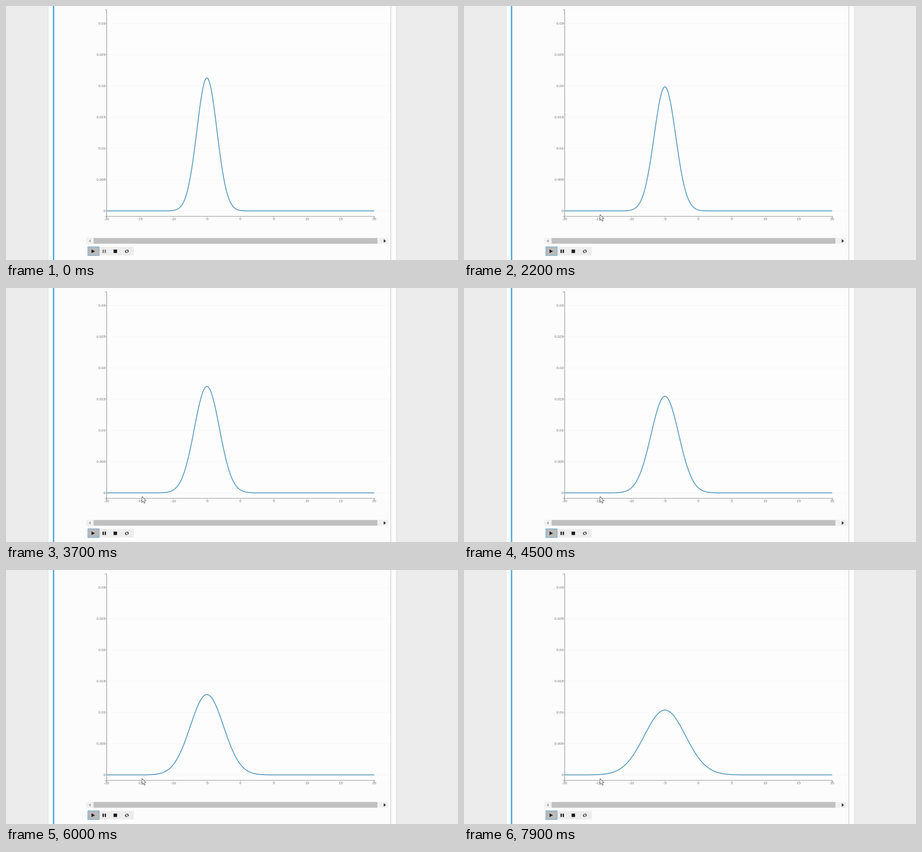
Write an HTML page with a canvas that moves like this. It is 998 px wide and 561 px high and loops after 8 s.

```html
<!DOCTYPE html>
<html lang="en">
<head>
<meta charset="utf-8">
<title>Spreading wave packet</title>
<style>
  html, body { margin: 0; width: 100%; height: 100%; overflow: hidden; background: #ececec; }
  canvas { display: block; width: 998px; height: 561px; }
</style>
</head>
<body>
<canvas id="stage" width="998" height="561"></canvas>
<script>
const ctx = document.getElementById('stage').getContext('2d');
const LOOP = 8000, STEP = 100, START = 400;

// Plot coordinates
const LEFT = 222, UNIT_X = 14.775, BASE = 452.6, UNIT_Y = 13806;
const px = x => LEFT + (x + 20) * UNIT_X;
const py = y => BASE - y * UNIT_Y;

// Packet: centre, initial width, grid spacing
const MEAN = -5, SIGMA = 1.5, DX = 0.08;

// [time, dimensionless spreading time]
const SPREAD = [
  [START, 0], [900, 0.106], [2200, 0.387], [3700, 0.749],
  [5400, 1.167], [6700, 1.496], [7900, 1.79]
];

function spreadAt(t) {
  if (t <= START) return 0;
  for (let i = 1; i < SPREAD.length; i++) {
    const [t0, a] = SPREAD[i - 1], [t1, b] = SPREAD[i];
    if (t <= t1) return a + (b - a) * (t - t0) / (t1 - t0);
  }
  return SPREAD[SPREAD.length - 1][1];
}

function rect(x, y, w, h, color) {
  ctx.fillStyle = color;
  ctx.fillRect(x, y, w, h);
}

function trace(points) {
  ctx.beginPath();
  points.forEach(([x, y], i) => i ? ctx.lineTo(x, y) : ctx.moveTo(x, y));
}

function fillShape(points, color) {
  trace(points);
  ctx.closePath();
  ctx.fillStyle = color;
  ctx.fill();
}

function strokeShape(points, color, width) {
  trace(points);
  ctx.strokeStyle = color;
  ctx.lineWidth = width;
  ctx.stroke();
}

function drawPage() {
  rect(0, 0, 998, 561, '#ececec');
  rect(92, 0, 771, 561, '#e6e6e6');
  rect(94, 0, 767, 561, '#fefefe');
  rect(103.5, 0, 3, 561, '#4ba3d9');
  rect(107, 0, 742, 561, '#fcfcfc');
  rect(222, 8, 626, 457, '#fdfdfd');
  rect(849, 0, 1.3, 561, '#cacaca');
}

function drawAxes() {
  ctx.font = '7.8px "Liberation Sans", Arial, sans-serif';
  ctx.textBaseline = 'middle';
  ctx.textAlign = 'right';
  for (let i = 0; i <= 6; i++) {
    const y = py(i * 0.005);
    rect(LEFT, y - 0.5, 626, 1, '#f6f6f6');
    rect(219, y - 0.5, 3, 1, '#b0b0b0');
    ctx.fillStyle = '#6c6c6c';
    ctx.fillText(String(i * 5 / 1000), 219.5, y + 0.5);
  }
  ctx.textAlign = 'center';
  for (let x = -20; x <= 20; x += 5) {
    rect(px(x) - 0.5, 465, 1, 2, '#b0b0b0');
    ctx.fillStyle = '#6c6c6c';
    ctx.fillText(String(x), px(x), 470.5);
  }
  strokeShape([[218, 8.5], [222.3, 8.5], [222.3, 464.5], [218, 464.5]], '#8e8e8e', 1.2);
  strokeShape([[222.3, 469], [222.3, 464.5], [813, 464.5], [813, 469]], '#8e8e8e', 1.2);
}

function drawCurve(t) {
  const sigma = SIGMA * Math.hypot(1, spreadAt(t));
  const peak = DX / (sigma * Math.sqrt(2 * Math.PI));
  const points = [];
  for (let x = -20; x <= 20.001; x += DX) {
    const z = (x - MEAN) / sigma;
    points.push([px(x), py(peak * Math.exp(-z * z / 2))]);
  }
  ctx.lineJoin = 'round';
  strokeShape(points, '#5d9dc0', 2);
  ctx.lineJoin = 'miter';
}

function drawScrollbar() {
  rect(177, 512, 667, 13.5, '#f1f1f1');
  rect(193.5, 512.5, 626.5, 12.5, '#c0c0c0');
  fillShape([[187, 515.5], [187, 522.5], [182.5, 519]], '#a8a8a8');
  fillShape([[834, 515], [834, 523], [839, 519]], '#383838');
}

function drawButtons(running) {
  rect(180, 532, 102, 19, '#ededed');
  rect(180.5, 531.5, 25.5, 20, '#b9b9b9');
  ctx.strokeStyle = '#7db3d6';
  ctx.lineWidth = 1.4;
  ctx.strokeRect(180.7, 531.9, 25, 19.2);
  fillShape([[188.8, 537.6], [188.8, 545.8], [196.3, 541.7]], '#1c1c1c');

  const pause = running ? '#202020' : '#777';
  rect(213.2, 538, 2.8, 7.5, pause);
  rect(217.9, 538, 2.8, 7.5, pause);
  rect(237.5, 538, 7.7, 7.5, '#1c1c1c');

  // Repeat arrows
  strokeShape([[264, 542], [264, 544.6], [268.2, 544.6]], '#333', 1.4);
  strokeShape([[265.4, 539.2], [269.6, 539.2], [269.6, 541.8]], '#333', 1.4);
  fillShape([[262, 542.2], [266, 542.2], [264, 539.2]], '#333');
  fillShape([[267.6, 541.6], [271.6, 541.6], [269.6, 544.6]], '#333');
}

function drawCursor() {
  const arrow = [[300.3, 460.5], [300.3, 473.5], [303.2, 470.9], [305.1, 475.2],
    [307.3, 474.2], [305.4, 470], [309, 469.6]];
  fillShape(arrow, '#fff');
  strokeShape([...arrow, arrow[0]], '#6a6a6a', 1.1);
}

function draw(now) {
  const t = Math.floor((now % LOOP) / STEP) * STEP;
  const running = t >= START;
  drawPage();
  drawAxes();
  drawCurve(t);
  drawScrollbar();
  drawButtons(running);
  if (running) drawCursor();
}

let origin = null;
function tick(now) {
  if (origin === null) origin = now;
  draw(now - origin);
  requestAnimationFrame(tick);
}
draw(0);
requestAnimationFrame(tick);
</script>
</body>
</html>
```
